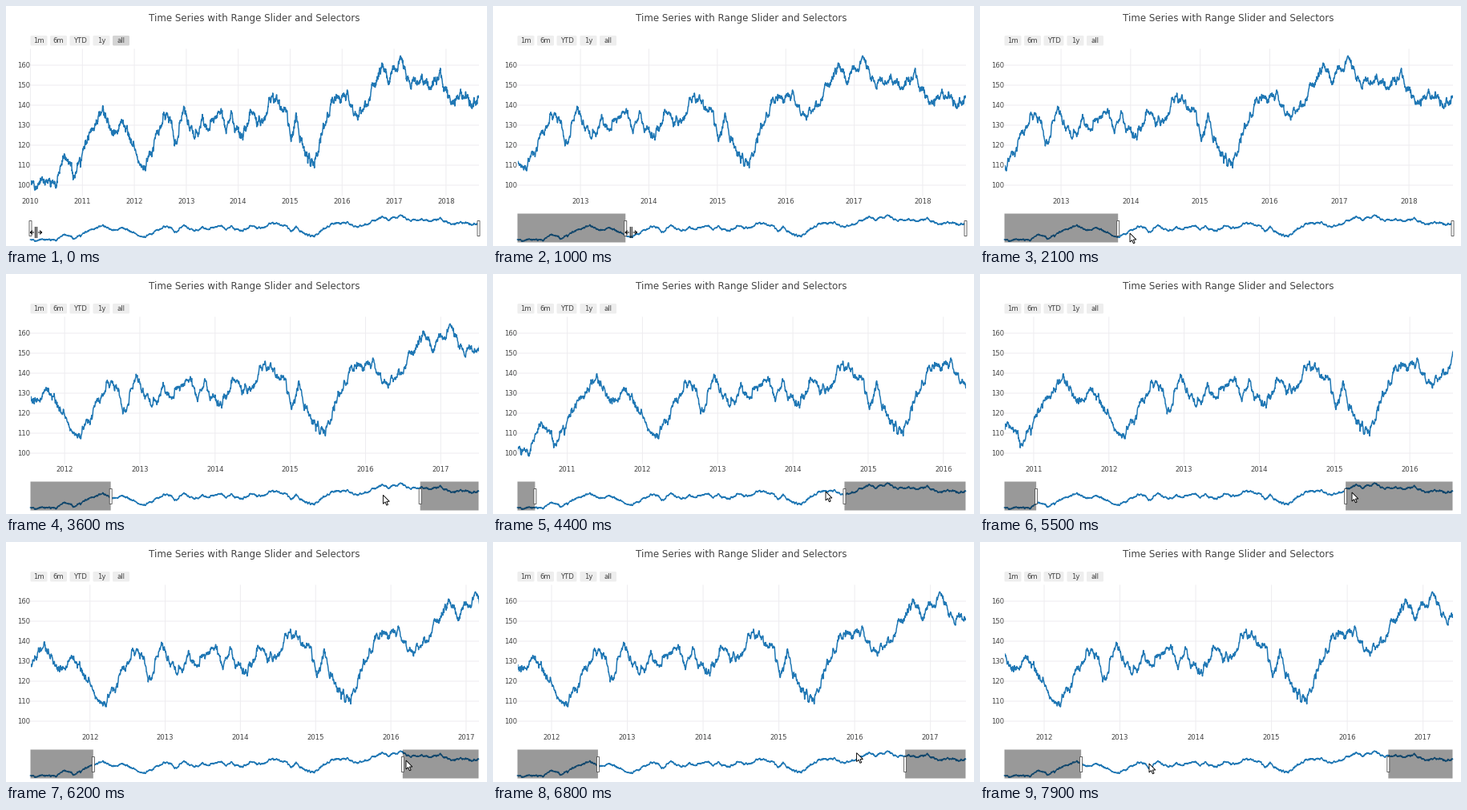
A matplotlib script that plays this animation: 600x300 px, repeating every 8 s.

```python
import numpy as np
import matplotlib.pyplot as plt
from matplotlib.animation import FuncAnimation
from matplotlib.patches import FancyBboxPatch, Polygon, Rectangle

W, H, DPI = 600, 300, 100
FRAMES, INTERVAL = 80, 100
PT = 72 / DPI  # points per pixel

LEFT, RIGHT = 30.5, 589.5
TOP, BOTTOM = 54, 237
S_TOP, S_BOTTOM = 259.5, 295.5
T0, T1 = 2010, 2018.627
BLUE, INK, GRID = "#1f77b4", "#444444", "#eeedf0"

plt.rcParams["font.family"] = "DejaVu Sans"

# Main swings of the series: years since 2010, value
SWINGS = np.array([
    (0, 102), (.5, 102), (.65, 117), (.82, 105), (1.06, 121), (1.4, 138),
    (1.6, 125), (1.78, 134), (2.18, 108), (2.63, 137), (2.79, 121),
    (2.955, 138), (3.16, 125), (3.31, 133), (3.39, 126), (3.64, 137),
    (3.76, 128), (3.88, 135), (4.05, 124), (4.27, 137), (4.43, 130),
    (4.65, 145), (4.93, 135), (5.015, 122), (5.11, 133), (5.35, 112),
    (5.47, 111), (5.64, 129), (5.85, 142), (6.1, 145), (6.3, 134),
    (6.5, 144), (6.77, 159), (6.9, 154), (7.125, 162), (7.32, 149),
    (7.55, 154), (7.65, 149), (7.89, 155), (8.1, 140), (8.4, 147),
    (8.5, 139), (8.627, 144),
])

# Pointer stops after the left handle is released: frame, x, y
STOPS = np.array([
    (21, 187, 284), (24, 590, 280), (28, 558, 280), (31, 505, 279),
    (44, 415, 272), (55, 464, 273), (62, 499, 273), (69, 446, 262),
    (72, 300, 150), (74, 104, 270), (75, 217, 278), (79, 211, 277),
])

ARROW = np.array([(0, 0), (0, 11), (2.6, 8.6), (4.4, 12.8), (6.1, 12),
                  (4.4, 8), (7.9, 8)])


def resize_shape():
    """Two bars with an arrow to each side, as one broken line."""
    gap = (np.nan, np.nan)
    points = []
    for s in (-1, 1):
        points += [(s, -6.5), (s, 6.5), gap, (3 * s, 0), (7 * s, 0), gap,
                   (5 * s, -2), (7 * s, 0), (5 * s, 2), gap]
    return np.array(points)


def make_series(n=2250):
    rng = np.random.default_rng(7)
    noise = np.zeros(n)
    for i, step in enumerate(rng.normal(0, .85, n - 1), 1):
        noise[i] = .84 * noise[i - 1] + step
    t = np.linspace(T0, T1, n)
    return t, np.interp(t - T0, *SWINGS.T) + noise


def ramp(f, a, b):
    return min(max((f - a) / (b - a), 0), 1)


def smooth(f, a, b):
    u = ramp(f, a, b)
    return u * u * (3 - 2 * u)


def value_y(v):
    return 224 - (v - 100) * 2.5


def slider_x(t):
    return LEFT + (t - T0) / (T1 - T0) * (RIGHT - LEFT)


def view(f):
    """Visible range: left handle drag, right handle drag, then panning."""
    start = T0 + 2.187 * (1 - (1 - ramp(f, 1, 18)) ** 4)
    start -= 2.087 * smooth(f, 29, 48)
    start += 1.45 * ramp(f, 49, 66) - .074 * ramp(f, 77, 79)
    if f <= 28:
        return start, T1 - .483 * ramp(f, 23, 28)
    return start, start + 5.957 - .043 * ramp(f, 62, 66)


def pointer(f, start):
    """Position and whether the resize pointer shows."""
    if f < 21:
        return slider_x(start) + 7, 283, True
    frames, xs, ys = STOPS.T
    return np.interp(f, frames, xs), np.interp(f, frames, ys), 24 <= f <= 28


fig = plt.figure(figsize=(W / DPI, H / DPI), dpi=DPI, facecolor="white")
ax = fig.add_axes([0, 0, 1, 1])
ax.set(xlim=(0, W), ylim=(H, 0))
ax.axis("off")


def label(x, y, text, size=8.5, ha="center"):
    return ax.text(x, y, text, fontsize=size * PT, color=INK, ha=ha,
                   va="baseline", zorder=5)


def stroke(xs, ys, color, width, z):
    return ax.plot(xs, ys, color=color, lw=width * PT, zorder=z, snap=False,
                   solid_joinstyle="round")[0]


def box(x, y, w, h, z, **style):
    return ax.add_patch(Rectangle((x, y), w, h, zorder=z, snap=False, **style))


label(310.2, 18.5, "Time Series with Range Slider and Selectors", 11.95)

buttons = []
for name, x0, x1 in (("1m", 30.5, 51.5), ("6m", 55, 76), ("YTD", 79.5, 104.5),
                     ("1y", 108.5, 129.5), ("all", 133, 154)):
    buttons.append(ax.add_patch(FancyBboxPatch(
        (x0, 37), x1 - x0, 12.5, boxstyle="round,pad=0,rounding_size=1.5",
        fc="#eeeeee", ec="none")))
    label((x0 + x1) / 2, 46.2, name)

for v in range(100, 170, 10):
    stroke([LEFT, RIGHT], [value_y(v)] * 2, GRID, 1, 1)
    label(29.8, value_y(v) + 3.1, str(v), ha="right")

years = [(y, stroke([0, 0], [TOP, BOTTOM], GRID, 1, 1), label(0, 247.2, str(y)))
         for y in range(2010, 2019)]

times, values = make_series()
main = stroke([], [], BLUE, 1.5, 3)
main.set_clip_path(box(LEFT, TOP, RIGHT - LEFT, BOTTOM - TOP, 0,
                       fc="none", ec="none"))

scale = (S_BOTTOM - S_TOP) / (BOTTOM - TOP)
stroke(slider_x(times), S_TOP + (value_y(values) - TOP) * scale, BLUE, 1.5, 3)
masks = [box(LEFT, S_TOP, 0, S_BOTTOM - S_TOP, 4, fc="black", ec="none",
             alpha=.4) for _ in range(2)]
handles = [box(0, 268.5, 3, 19, 6, fc="white", ec=INK, lw=.8 * PT)
           for _ in range(2)]

arrow = ax.add_patch(Polygon(ARROW, fc="white", ec="black", lw=.9 * PT,
                             zorder=8))
resize = stroke([], [], "#111111", 1.1, 8)
RESIZE = resize_shape()


def draw(f):
    start, end = view(f)

    def view_x(t):
        return LEFT + (t - start) / (end - start) * (RIGHT - LEFT)

    main.set_data(view_x(times), value_y(values))
    for year, line, text in years:
        shown = start <= year <= end
        line.set_visible(shown)
        text.set_visible(shown)
        line.set_xdata([view_x(year)] * 2)
        text.set_x(view_x(year))

    a, b = slider_x(start), slider_x(end)
    masks[0].set_width(a - LEFT)
    masks[1].set_x(b)
    masks[1].set_width(RIGHT - b)
    for handle, x in zip(handles, (a, b)):
        handle.set_x(x - 1.5)
    buttons[-1].set_facecolor("#d4d4d4" if start == T0 else "#eeeeee")

    x, y, resizing = pointer(f, start)
    arrow.set_visible(not resizing)
    resize.set_visible(resizing)
    arrow.set_xy(ARROW + (x, y))
    resize.set_data(*(RESIZE + (x, y)).T)
    return []


anim = FuncAnimation(fig, draw, frames=FRAMES, interval=INTERVAL,
                     repeat=True, repeat_delay=0, blit=False)
plt.show()
```
